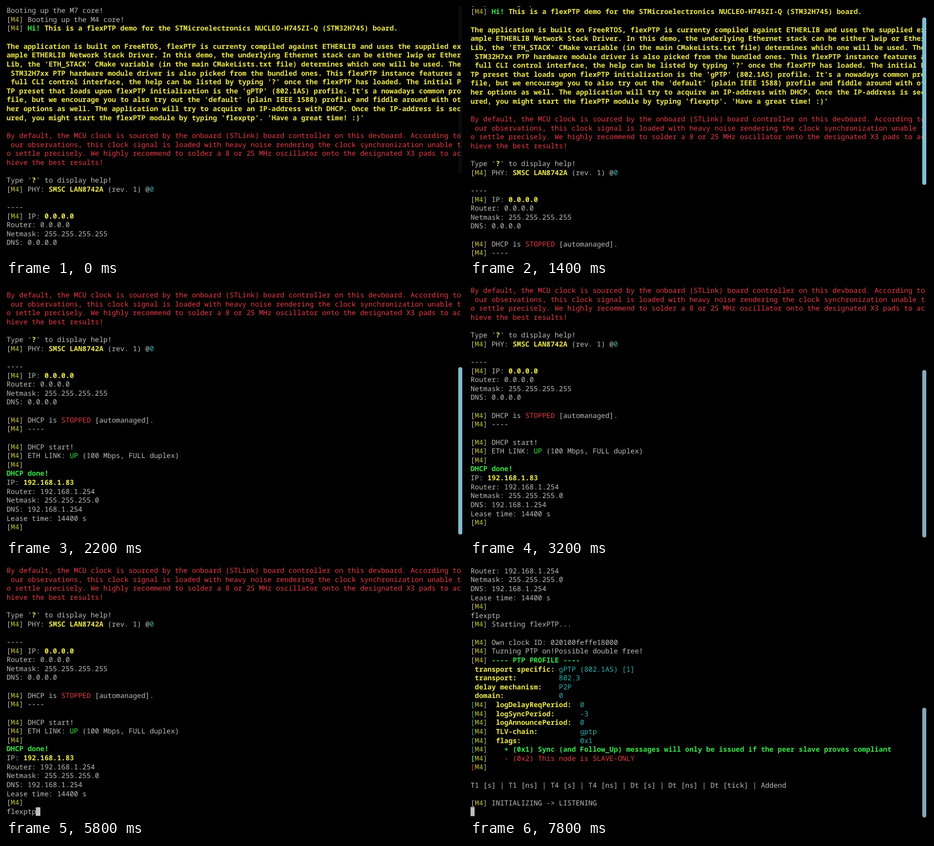
Write an HTML page that moves like this. It is 800 px wide and 441 px high and loops after 8000 ms.

```html
<!DOCTYPE html>
<html lang="en">
<head>
<meta charset="utf-8">
<title>Terminal</title>
<style>
  html, body { margin: 0; width: 100%; height: 100%; overflow: hidden; background: #000; }
  #stage { position: relative; width: 800px; height: 441px; overflow: hidden; background: #000; }
  pre {
    position: absolute; left: 1px; top: 0.2px; margin: 0;
    font: 500 12.25px/15.62px "Noto Sans Mono", "DejaVu Sans Mono", monospace;
    text-rendering: geometricPrecision;
    font-variant-ligatures: none;
    color: #bebebe;
  }
  i { font-style: normal; color: #c4c03a; }
  b { font-weight: 600; }
  .y { color: #ece84c; }
  .g { color: #3ae64a; }
  .r { font-weight: 500; color: #e83c46; }
  .c { font-weight: 500; color: #2cb4b0; }
  .up { font-weight: 500; }
  #cursor {
    position: absolute; width: 7.35px; height: 15.62px; overflow: hidden;
    background: #bebebe; color: #000;
  }
  #bar { position: absolute; left: 790px; width: 7px; border-radius: 4px; }
  [hidden] { display: none; }
</style>
</head>
<body>
<div id="stage">
<pre id="term">Booting up the M7 core!
[<i>M4</i>] Booting up the M4 core!
[<i>M4</i>] <b class="g">Hi!</b> <b class="y">This is a flexPTP demo for the STMicroelectronics NUCLEO-H745ZI-Q (STM32H745) board.

The application is built on FreeRTOS, flexPTP is currenty compiled against ETHERLIB and uses the supplied ex
ample ETHERLIB Network Stack Driver. In this demo, the underlying Ethernet stack can be either lwip or Ether
Lib, the 'ETH_STACK' CMake variable (in the main CMakeLists.txt file) determines which one will be used. The
 STM32H7xx PTP hardware module driver is also picked from the bundled ones. This flexPTP instance features a
 full CLI control interface, the help can be listed by typing '?' once the flexPTP has loaded. The initial P
TP preset that loads upon flexPTP initialization is the 'gPTP' (802.1AS) profile. It's a nowadays common pro
file, but we encourage you to also try out the 'default' (plain IEEE 1588) profile and fiddle around with ot
her options as well. The application will try to acquire an IP-address with DHCP. Once the IP-address is sec
ured, you might start the flexPTP module by typing 'flexptp'. 'Have a great time! :)'</b>

<b class="r">By default, the MCU clock is sourced by the onboard (STLink) board controller on this devboard. According to
 our observations, this clock signal is loaded with heavy noise rendering the clock synchronization unable t
o settle precisely. We highly recommend to solder a 8 or 25 MHz oscillator onto the designated X3 pads to ac
hieve the best results!</b>

Type '<b class="y">?</b>' to display help!
[<i>M4</i>] PHY: <b class="y">SMSC LAN8742A</b> (rev. 1) @<b class="c">0</b>

----
[<i>M4</i>] IP: <b class="y">0.0.0.0</b>
Router: 0.0.0.0
Netmask: 255.255.255.255
DNS: 0.0.0.0

[<i>M4</i>] DHCP is <b class="r">STOPPED</b> [automanaged].
[<i>M4</i>] ----

[<i>M4</i>] DHCP start!
[<i>M4</i>] ETH LINK: <b class="g up">UP</b> (100 Mbps, FULL duplex)
[<i>M4</i>]
<b class="g">DHCP done!</b>
IP: <b class="y">192.168.1.83</b>
Router: 192.168.1.254
Netmask: 255.255.255.0
DNS: 192.168.1.254
Lease time: 14400 s
[<i>M4</i>]
<span id="typed"></span>
<span id="reply" hidden>[<i>M4</i>] Starting flexPTP...

[<i>M4</i>] Own clock ID: 020100feffe18000
[<i>M4</i>] Turning PTP on!Possible double free!
[<i>M4</i>] <b class="g">---- PTP PROFILE ----</b>
<b class="y"> transport specific: </b><b class="c">gPTP (802.1AS) [1]</b>
<b class="y"> transport:          </b><b class="c">802.3</b>
<b class="y"> delay mechanism:    </b><b class="c">P2P</b>
<b class="y"> domain:             </b><b class="c">0</b>
<b class="c">[</b><i>M4</i>]  <b class="y">logDelayReqPeriod:  </b><b class="c">0</b>
<b class="c">[</b><i>M4</i>]  <b class="y">logSyncPeriod:      </b><b class="c">-3</b>
<b class="c">[</b><i>M4</i>]  <b class="y">logAnnouncePeriod:  </b><b class="c">0</b>
<b class="c">[</b><i>M4</i>]  <b class="y">TLV-chain:          </b><b class="c">gptp</b>
<b class="c">[</b><i>M4</i>]  <b class="y">flags:              </b><b class="c">0x1</b>
<b class="c">[</b><i>M4</i>]    <b class="g">+ (0x1) Sync (and Follow_Up) messages will only be issued if the peer slave proves compliant</b>
<b class="g">[</b><i>M4</i>]    <b class="r">- (0x2) This node is SLAVE-ONLY</b>
<b class="r">[</b><i>M4</i>]

T1 [s] | T1 [ns] | T4 [s] | T4 [ns] | Dt [s] | Dt [ns] | Dt [tick] | Addend
</span><span id="state" hidden>
[<i>M4</i>] INITIALIZING -&gt; LISTENING
</span><span id="cursor"></span></pre>
<div id="bar"></div>
</div>
<script>
  const LOOP = 8000, TICK = 200;
  const ROW = 15.62, COL = 7.35, VIEW = 28, HEIGHT = 440;
  const COMMAND = "flexptp";
  const ENTER = 6800, REPLY = 7400, STATE = 7600;

  // [time, scrolled pixels]
  const drag = [[1000, 0], [1200, 7], [1400, 29.5], [1800, 150.3], [2000, 190],
                [2200, 211], [2400, 14 * ROW]];
  // [time, red, green, blue, alpha]
  const glow = [[0, 110, 125, 135, 0.08], [600, 130, 160, 180, 0.8], [1000, 130, 190, 212, 1],
                [2000, 132, 190, 212, 1], [3200, 138, 168, 190, 1], [4800, 76, 83, 94, 1],
                [5600, 76, 83, 94, 0], [7200, 134, 166, 188, 0], [7800, 134, 166, 188, 1]];

  const $ = id => document.getElementById(id);
  const [term, typed, reply, state, cursor, bar] =
    ["term", "typed", "reply", "state", "cursor", "bar"].map($);

  function track(points, t) {
    const next = points.findIndex(p => p[0] > t);
    if (next === 0) return points[0].slice(1);
    if (next < 0) return points[points.length - 1].slice(1);
    const a = points[next - 1], b = points[next];
    const k = (t - a[0]) / (b[0] - a[0]);
    return a.slice(1).map((v, i) => v + (b[i + 1] - v) * k);
  }

  function draw(t) {
    const count = t < 4800 ? 0 : Math.min(COMMAND.length, 1 + Math.floor((t - 4800) / 160));
    typed.textContent = COMMAND.slice(0, count);
    reply.hidden = t < REPLY;
    state.hidden = t < STATE;

    const last = t < REPLY ? 41 : t < STATE ? 61 : 63;
    const scroll = t < REPLY ? track(drag, t)[0] : (last + 1 - VIEW) * ROW;
    term.style.transform = `translateY(${-scroll}px)`;

    cursor.hidden = !count;
    cursor.style.left = (t < ENTER ? count * COL : 0) + "px";
    cursor.style.top = last * ROW + "px";
    cursor.textContent = t >= ENTER && t < REPLY ? COMMAND[0] : "";

    const scale = HEIGHT / ((last + 1) * ROW);
    const [r, g, b, a] = track(glow, t);
    bar.style.top = scroll * scale + "px";
    bar.style.height = VIEW * ROW * scale + "px";
    bar.style.background = `rgba(${r}, ${g}, ${b}, ${a})`;
  }

  const start = performance.now();
  function frame() {
    const t = (performance.now() - start) % LOOP;
    draw(Math.floor(t / TICK) * TICK);
    requestAnimationFrame(frame);
  }
  frame();
</script>
</body>
</html>
```
